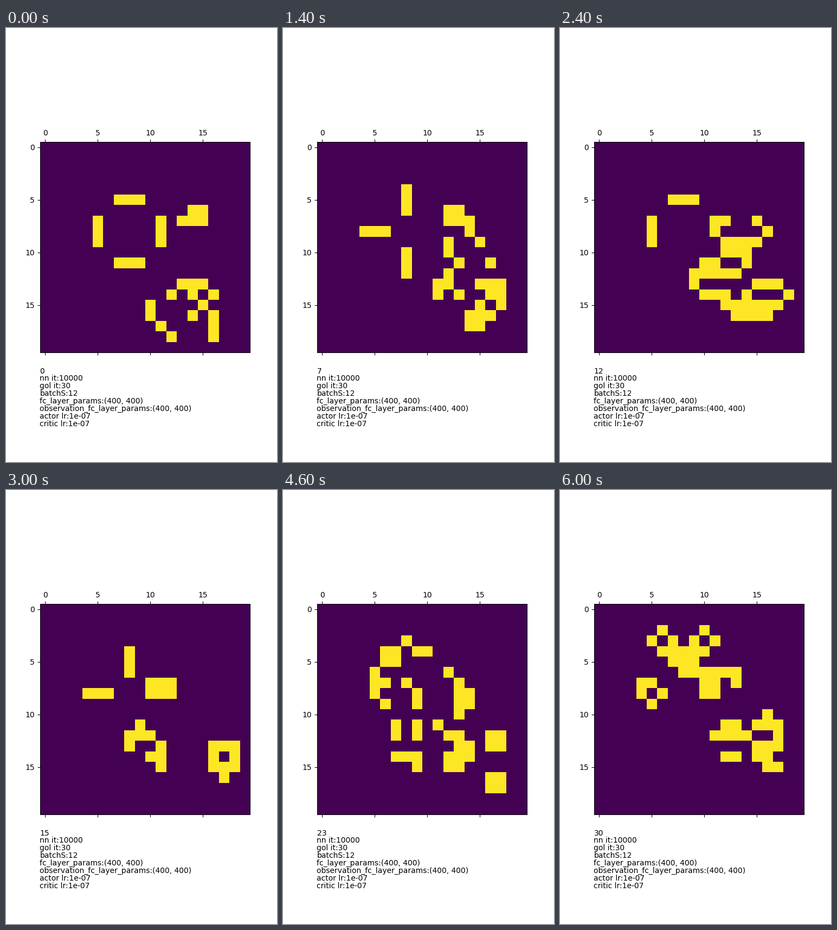
Write a matplotlib script that moves like this. It is 500 px wide and 800 px high and loops after 8000 ms.

```python
import matplotlib.pyplot as plt
import numpy as np
from matplotlib.animation import FuncAnimation

WIDTH, HEIGHT, DPI = 500, 800, 100
SIZE = 20
LIVE = slice(2, SIZE - 1)  # births happen only inside this band
STEPS = 30
HOLD = 9  # extra ticks on the last generation
TICK_MS = 200

CAPTION = (
    "nn it:10000",
    "gol it:30",
    "batchS:12",
    "fc_layer_params:(400, 400)",
    "observation_fc_layer_params:(400, 400)",
    "actor lr:1e-07",
    "critic lr:1e-07",
)
TEXT_X, COUNTER_Y, CAPTION_Y, LINE_STEP = 62.5, 637, 650, 14

ACROSS, DOWN, FALLING, RISING = (0, 1), (1, 0), (1, 1), (1, -1)


def stroke(board, row, col, direction, length):
    """Set a straight run of cells alive."""
    i = np.arange(length)
    board[row + direction[0] * i, col + direction[1] * i] = 1


def first_board():
    board = np.zeros((SIZE, SIZE), dtype=int)
    # four blinkers around (8, 8)
    for shift in (-3, 3):
        stroke(board, 8 + shift, 7, ACROSS, 3)
        stroke(board, 7, 8 + shift, DOWN, 3)
    # wedge at the upper right
    stroke(board, 6, 14, ACROSS, 2)
    stroke(board, 7, 13, ACROSS, 3)
    # open loop at the lower right
    stroke(board, 13, 13, ACROSS, 3)
    stroke(board, 14, 12, (0, 2), 2)
    stroke(board, 14, 16, RISING, 3)
    stroke(board, 15, 10, DOWN, 2)
    stroke(board, 17, 11, FALLING, 2)
    stroke(board, 16, 16, DOWN, 3)
    return board


def next_board(board):
    """One Game of Life step; cells outside the live band stay dead."""
    padded = np.pad(board, 1)
    around = sum(
        padded[dy:dy + SIZE, dx:dx + SIZE] for dy in range(3) for dx in range(3)
    ) - board
    alive = (around == 3) | ((around == 2) & (board == 1))
    result = np.zeros_like(board)
    result[LIVE, LIVE] = alive[LIVE, LIVE]
    return result


boards = [first_board()]
for _ in range(STEPS):
    boards.append(next_board(boards[-1]))

fig, ax = plt.subplots(figsize=(WIDTH / DPI, HEIGHT / DPI), dpi=DPI)
image = ax.matshow(boards[0], cmap="viridis", vmin=0, vmax=1)


def text_line(y, text):
    return fig.text(TEXT_X / WIDTH, 1 - y / HEIGHT, text, fontsize=10)


counter = text_line(COUNTER_Y, "0")
for i, line in enumerate(CAPTION):
    text_line(CAPTION_Y + i * LINE_STEP, line)


def update(tick):
    step = min(tick, STEPS)
    image.set_data(boards[step])
    counter.set_text(str(step))
    return image, counter


anim = FuncAnimation(
    fig, update, frames=STEPS + 1 + HOLD, interval=TICK_MS, repeat=True
)

plt.show()
```
